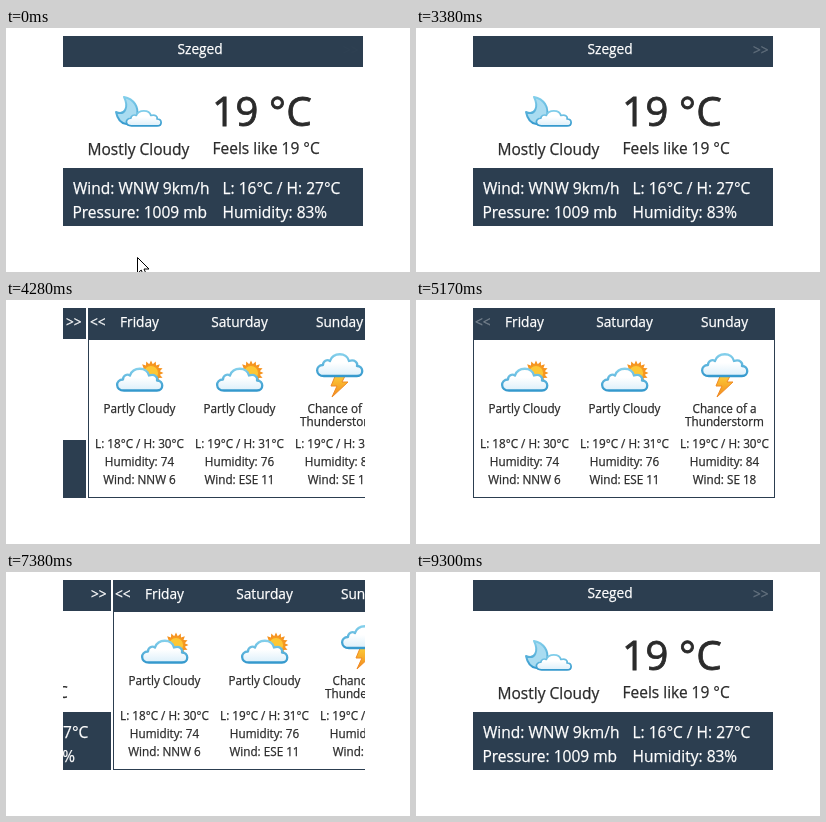
Write an HTML page that moves like this. It is 404x244 px and loops after 9340 ms.

```html
<!DOCTYPE html>
<html lang="en">
<head>
<meta charset="utf-8">
<title>Weather widget</title>
<style>
  html, body { margin: 0; width: 100%; height: 100%; overflow: hidden; background: #fff; }
  svg { display: block; width: 404px; height: 244px; }
  text {
    font: 15.5px "Open Sans", "Noto Sans", sans-serif; white-space: pre;
    fill: #2b2b2b; stroke: #2b2b2b; stroke-width: .25px;
  }
  .light text, text.light { fill: #fff; stroke: #fff; }
  text.title { font-size: 13.7px; }
  text.big { font-size: 40.5px; stroke-width: .8px; }
  .day text:not(.title) { font-size: 11.7px; }
  .day { text-anchor: middle; }
  .bar { fill: #2c3e50; }
</style>
</head>
<body>
<svg viewBox="0 0 404 244">
  <defs>
    <clipPath id="view"><rect x="57" y="8" width="302" height="190"/></clipPath>
    <linearGradient id="blue" x2="0" y2="1">
      <stop stop-color="#83cfeb"/><stop offset="1" stop-color="#3599cd"/>
    </linearGradient>
    <linearGradient id="white" x2="0" y2="1">
      <stop offset=".4" stop-color="#fff"/><stop offset="1" stop-color="#dceffa"/>
    </linearGradient>
    <linearGradient id="fire" x2="0" y2="1">
      <stop stop-color="#fdd03b"/><stop offset="1" stop-color="#f28a1c"/>
    </linearGradient>
    <path id="cloud" fill="url(#white)" stroke="url(#blue)" stroke-width="2.3" stroke-linejoin="round"
      d="M8 23C-1 23-1 12 7 12C7 8 11 6 14 8C17-1 31-1 33 8C39 6 42 10 41 13C48 13 48 23 41 23Z"/>
    <g id="partly">
      <path id="rays" fill="#f6931f"/>
      <circle cx="35" cy="11" r="7.8" fill="#fdc735" stroke="#f59b22" stroke-width="1.5"/>
      <use href="#cloud" y="5.5"/>
    </g>
    <g id="storm">
      <path d="M20 21H30L26 29H32L16 44L21 33H15Z" fill="url(#fire)" stroke="#f08a24"/>
      <use href="#cloud"/>
    </g>
  </defs>
  <g clip-path="url(#view)">
    <g id="slider">
      <path class="bar" d="M57 8h300v31h-300zM57 140h300v58h-300z"/>
      <text class="title light" x="171.5" y="26">Szeged</text>
      <path d="M118 69C128 71 133 79 131 88C128 100 113 99 110 84C119 88 123 79 118 69Z"
        fill="#a9dcf1" stroke="url(#blue)" stroke-width="2" stroke-linejoin="round"/>
      <use href="#cloud" transform="translate(119.500 82) scale(.77 .69)"/>
      <text x="81.500" y="127">Mostly Cloudy</text>
      <text class="big" x="206" y="98">19 °C</text>
      <text x="206.500" y="126">Feels like 19 °C</text>
      <g class="light">
        <text x="67" y="166">Wind: WNW 9km/h</text>
        <text x="66.500" y="190">Pressure: 1009 mb</text>
        <text x="216.500" y="166">L: 16°C / H: 27°C</text>
        <text x="216.500" y="190">Humidity: 83%</text>
      </g>
      <text class="title light arrow" x="337" y="26.500">&gt;&gt;</text>
      <g transform="translate(302)">
        <rect x="57.500" y="8.500" width="301" height="189" fill="#fff" stroke="#2c3e50"/>
        <path class="bar" d="M57 8h302v32h-302z"/>
        <text class="title light arrow" x="59" y="26.500">&lt;&lt;</text>
        <g id="days"></g>
      </g>
    </g>
  </g>
  <path id="cursor" d="M0 0V16L3.700 12.500L6.500 19L9.300 17.800L6.500 11.500H11.500Z" fill="#fff" stroke="#000"/>
</svg>
<script>
const LOOP = 9340, FIRST = 290, STEP = 147.7;
const $ = id => document.getElementById(id);
const clamp = v => Math.min(1, Math.max(0, v));

const days = [
  ["Friday", "partly", ["Partly Cloudy"], "18°C / H: 30°C", 74, "NNW 6"],
  ["Saturday", "partly", ["Partly Cloudy"], "19°C / H: 31°C", 76, "ESE 11"],
  ["Sunday", "storm", ["Chance of a", "Thunderstorm"], "19°C / H: 30°C", 84, "SE 18"],
];
const line = (y, s, cls = "") => `<text class="${cls}" y="${y}">${s}</text>`;
$("days").innerHTML = days.map(([name, icon, sky, range, humidity, wind], i) =>
  `<g class="day" transform="translate(${108.5 + 100 * i})">
    ${line(27, name, "title light")}
    <use href="#${icon}" x="-23.5" y="${icon === "storm" ? 53 : 62}"/>
    ${sky.map((s, j) => line(113 + 13 * j, s)).join("")}
    ${line(148, "L: " + range)}${line(166, "Humidity: " + humidity)}${line(184, "Wind: " + wind)}
  </g>`).join("");

// Sixteen-pointed star behind the sun disc
$("rays").setAttribute("d", "M" + Array.from({ length: 32 }, (_, i) => {
  const r = i % 2 ? 9 : 12.5, a = i * Math.PI / 16;
  return `${35 + r * Math.cos(a)} ${11 + r * Math.sin(a)}`;
}).join("L") + "Z");

// cubic-bezier(.25, .1, .25, 1)
function ease(x) {
  let lo = 0, hi = 1, s;
  for (let i = 0; i < 20; i++) {
    s = (lo + hi) / 2;
    if (.75 * s * (1 - s) + s ** 3 < x) lo = s; else hi = s;
  }
  return .3 * s * (1 - s) ** 2 + 3 * s * s * (1 - s) + s ** 3;
}
const swing = p => .5 - Math.cos(Math.PI * clamp(p)) / 2;

function pulse(t) {
  const half = 1475, phase = (t - 175 + 2 * half) / half;
  const e = ease(phase % 1);
  return Math.floor(phase) % 2 ? 1 - e : e;
}

const path = [[142, 131, 229], [1320, 228, 104], [2060, 334, 20], [2500, 344, 19]];
function cursorAt(t) {
  let [, x, y] = path[0];
  for (let i = 1; i < path.length; i++) {
    const [t0, x0, y0] = path[i - 1], [t1, x1, y1] = path[i];
    const p = clamp((t - t0) / (t1 - t0));
    x += (x1 - x0) * p;
    y += (y1 - y0) * p;
  }
  return `translate(${Math.round(x) + .5} ${Math.round(y) + .5})`;
}

function draw(now) {
  const t = now % LOOP;
  // The screen is sampled about seven times a second
  const s = t < FIRST ? 0 : FIRST + STEP * Math.floor((t - FIRST) / STEP + .1);
  const shift = 302 * (swing((s - 3795) / 592) - swing((s - 7221.5) / 592));
  $("slider").setAttribute("transform", `translate(${-Math.round(shift)})`);
  document.querySelectorAll(".arrow").forEach(a => a.setAttribute("opacity", pulse(s)));
  $("cursor").setAttribute("transform", cursorAt(s));
  $("cursor").setAttribute("visibility", s < 2700 ? "visible" : "hidden");
}

const start = performance.now();
(function tick() {
  draw(performance.now() - start);
  requestAnimationFrame(tick);
})();
</script>
</body>
</html>
```
